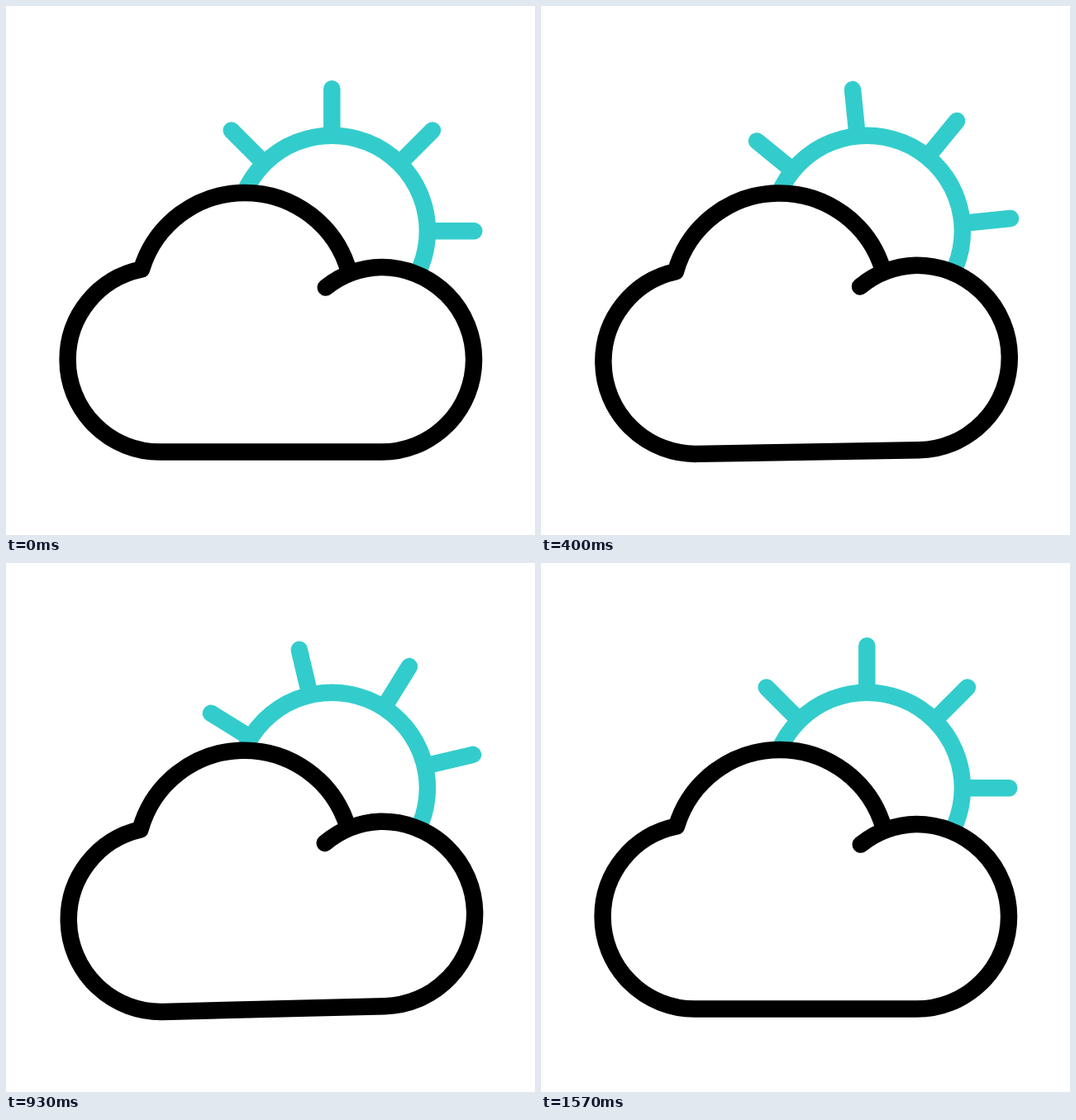
Write an HTML page that moves like this. It is 640 px wide and 640 px high and loops after 1670 ms.

```html
<!DOCTYPE html>
<html lang="en">
<head>
<meta charset="utf-8">
<title>Sun behind a cloud</title>
<style>
  html, body { margin: 0; width: 100%; height: 100%; overflow: hidden; background: #fff; }
  svg { display: block; width: 100vw; height: 100vh; }
</style>
</head>
<body>
<svg viewBox="0 0 640 640" fill="none" stroke-width="20.5" stroke-linecap="round" stroke-linejoin="round">
  <g stroke="#33cccc">
    <circle cx="394.3" cy="272.3" r="115.6"/>
    <g id="rays"></g>
  </g>
  <path id="cloud" fill="#fff" stroke="#000" d="M386.8 340.6
    A111.6 111.6 0 0 1 454.3 316.1
    A111.6 111.6 0 0 1 454.3 539.6
    H186
    A111.6 111.6 0 0 1 74.6 428
    A111.6 111.6 0 0 1 164 318.5
    A130.7 130.7 0 0 1 289 225.9
    A130.7 130.7 0 0 1 415 322"/>
</svg>
<script>
const LOOP = 1670, STEP = 100 / 3, LAST = 47;
const SUN = [394.3, 272.2], PIVOT = [320, 383];

// [step, degrees]
const SPIN = [[0, 0], [24.8, -107.2], [47, 0]];
const ROCK = [[0, 0], [7, 15], [15, -7.1], [22, 3.1], [29.5, -1.8], [38, 0]];

const rays = document.getElementById('rays');
const cloud = document.getElementById('cloud');

// The lower four rays sit slightly below the centre of the disc.
for (let i = 0; i < 8; i++) {
  const a = (i - 3) * Math.PI / 4;
  const drop = i > 3 ? 3.3 : 0;
  const at = r => [SUN[0] + r * Math.cos(a), SUN[1] + drop + r * Math.sin(a)];
  const ray = document.createElementNS('http://www.w3.org/2000/svg', 'path');
  ray.setAttribute('d', `M${at(118)}L${at(172)}`);
  rays.append(ray);
}

// Cubic Bezier easing (.46, 0, .535, 1)
function ease(x) {
  let lo = 0, hi = 1;
  for (let i = 0; i < 24; i++) {
    const s = (lo + hi) / 2, q = 1 - s;
    const bx = 3 * q * q * s * .46 + 3 * q * s * s * .535 + s * s * s;
    if (bx < x) lo = s; else hi = s;
  }
  return lo * lo * (3 - 2 * lo);
}

function track(keys, k) {
  for (let i = 1; i < keys.length; i++) {
    const [k0, v0] = keys[i - 1], [k1, v1] = keys[i];
    if (k < k1) return v0 + (v1 - v0) * ease((k - k0) / (k1 - k0));
  }
  return keys[keys.length - 1][1];
}

const turn = (el, deg, centre) =>
  el.setAttribute('transform', `rotate(${deg.toFixed(3)} ${centre.join(' ')})`);

function draw(ms) {
  const k = Math.min(LAST, Math.floor((ms % LOOP + 4) / STEP));
  turn(rays, track(SPIN, k), SUN);
  turn(cloud, track(ROCK, k), PIVOT);
}

let start;
function tick(now) {
  start ??= now;
  draw(Math.max(0, now - start));
  requestAnimationFrame(tick);
}
draw(0);
requestAnimationFrame(tick);
</script>
</body>
</html>
```
